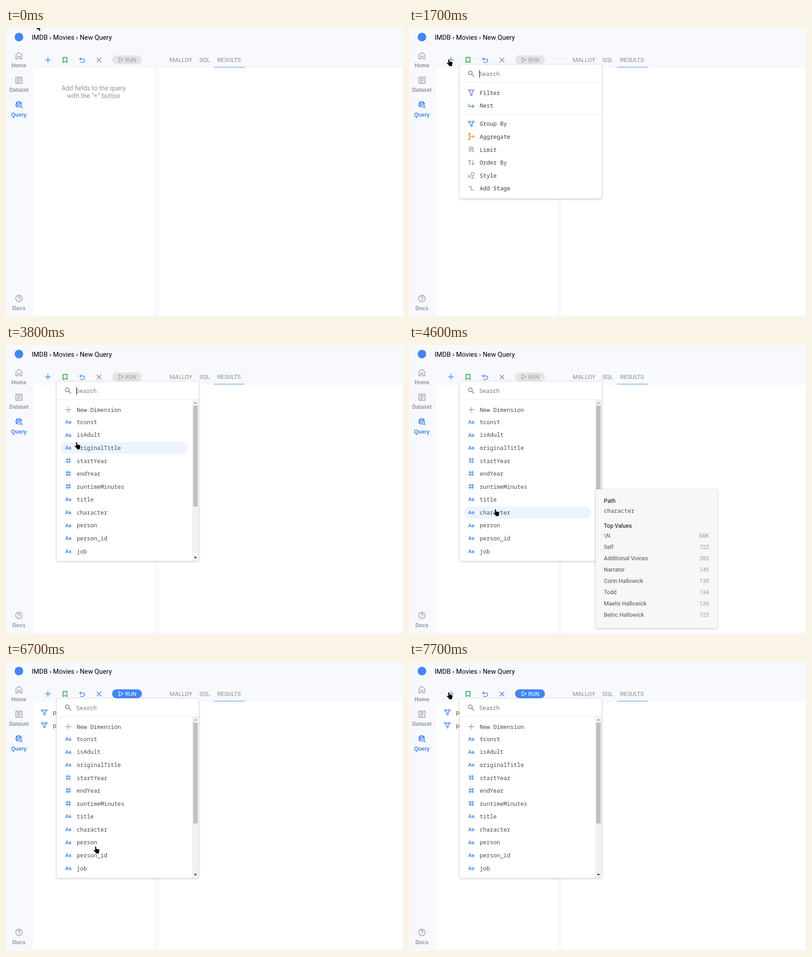
Write an HTML page with a canvas that moves like this. It is 876 by 639 pixels and loops after 8 s.

```html
<!DOCTYPE html>
<html lang="en">
<head>
<meta charset="utf-8">
<title>Query builder</title>
<style>
  html, body { margin: 0; width: 100%; height: 100%; overflow: hidden; background: #f8f9fd; }
  canvas { display: block; width: 876px; height: 639px; }
</style>
</head>
<body>
<canvas id="stage" width="876" height="639"></canvas>
<script>
const ctx = document.getElementById('stage').getContext('2d');
const LOOP = 8000, TICK = 100;
const BLUE = '#4285f4', GREEN = '#2ba24c', ORANGE = '#e8850c', PURPLE = '#7c5cd6', GRAY = '#939699';
const PAGE = '#f8f9fd', RULE = '#ececee';
const SANS = 'Roboto, sans-serif';
const MONO = '12.5px "Roboto Mono", "Noto Sans Mono", monospace';
const ROW = 28.57;

const ring = (x, y, r) =>
  `M${x - r} ${y}a${r} ${r} 0 1 0 ${2 * r} 0a${r} ${r} 0 1 0 ${-2 * r} 0`;

// Icon outlines, each around its own centre
const ICONS = {
  home: 'M-6.5 7.2V-2L0 -7.2L6.5 -2V7.2H2.2V1.5H-2.2V7.2Z',
  dataset: 'M-6.8 -6.8H6.8V6.8H-6.8ZM-4 -3.2H4M-4 0H4M-4 3.2H1.5',
  help: ring(0, 0, 7.2) + 'M-2.2 -1.7C-2.2 -4.8 2.4 -4.8 2.4 -1.8C2.4 0 0 0.2 0 2M0 3.3V4.6',
  plus: 'M-6.5 0H6.5M0 -6.5V6.5',
  bookmark: 'M-4.3 -5.6H4.3V5.4L0 3.4L-4.3 5.4Z',
  undo: 'M-2.5 -5.5L-5.5 -2.4L-2.5 .7M-5.5 -2.4H2C7 -2.4 7 5 2 5H-4',
  close: 'M-5 -5L5 5M5 -5L-5 5',
  play: 'M-4.5 -5L5 0L-4.5 5Z',
  search: ring(-1.7, -1.7, 4.2) + 'M1.6 1.6L6.8 6.8',
  filter: 'M-6 -5.8H6L1.7 0V5.8H-1.7V0Z',
  nest: 'M-5.5 -4.5V1.5H5.5M2.2 -2L5.8 1.5L2.2 5',
  group: ring(-4.6, -4.2, 1.9) + ring(4.6, -4.2, 1.9) + ring(.4, 4.4, 1.9) +
    'M-2.7 -4.2H2.7M-3.7 -2.5L-.6 2.8M3.8 -2.5L1.3 2.8',
  aggregate: ring(-3.8, -5.4, 1.9) + ring(-3.8, 5.2, 1.9) +
    'M-3.8 -3.5V3.3M-3.8 0H6.3M3.2 -3L6.4 0L3.2 3',
  limit: 'M-5.5 -5.2H5.5M-5.5 -2.2H5.5M-5.5 .8H5.5M-5.5 3.8H0M2 3L4 5L6 3',
  order: 'M-3.5 5.5V-5M-6.5 -2L-3.5 -5L-.5 -2M3.5 -5.5V5M.5 2L3.5 5L6.5 2',
  style: ring(3.2, -3, 3.4) + ring(-4.4, 2.6, 2.2) + ring(2.8, 5, 1.6),
  stage: 'M-6 -3.8H0V3.8H6',
  hash: 'M-2.6 -6V6M2.6 -6V6M-6 -2.6H6M-6 2.6H6',
  land: 'M-6.5 -1.5L-2 2V7M1 -6.5V-4.2H-2V-1.5H2',
  lens: ring(3.4, 3.2, 2.7) + 'M5.3 5.1L8.4 8.2'
};
const ARROW = new Path2D('M.5 0V14L3.7 11.2L6 16.4L8.6 15.3L6.3 10.2H10.8Z');
const HAND = new Path2D('M3.5 1.2C3.5 -.2 6 -.2 6 1.2V5L11.5 6.2C13 6.6 13.3 7.3 13 9' +
  'L12 12.5V15.3H5.2V13.5L.8 9.2C0 8 1.4 6.9 2.6 8L3.9 9Z');

const ACTIONS = [
  ['Filter', 'filter', PURPLE, 143.5], ['Nest', 'nest', GREEN, 172],
  ['Group By', 'group', BLUE, 212], ['Aggregate', 'aggregate', ORANGE, 240.6],
  ['Limit', 'limit', GRAY, 269.2], ['Order By', 'order', GRAY, 297.8],
  ['Style', 'style', GRAY, 326.4], ['Add Stage', 'stage', GRAY, 355]
];
const FIELDS = ['tconst', 'isAdult', 'originalTitle', 'startYear', 'endYear', 'runtimeMinutes',
  'title', 'character', 'person', 'person_id', 'job'];
const NUMERIC = /Year|Minutes/;

const TOP = {
  character: [['\\N', '88K'], ['Self', 722], ['Additional Voices', 283], ['Narrator', 145],
    ['Corin Hallowick', 135], ['Todd', 134], ['Maelis Hallowick', 126], ['Belric Hallowick', 123]],
  person: ['Orlen Tavish', 'Mira Quennell', 'Pell Ostrander', 'Jorin Maddick', 'Tessa Wrenfield',
    'Aldo Brimley', 'Nell Harkaway', 'Ivor Stanwell'].map((n, i) => [n, 214 - 9 * i]),
  person_id: Array.from({ length: 8 }, (_, i) => ['nm00' + (10473 + i * 3719), 214 - 9 * i])
};
// [start, end, field]
const TIPS = [[4500, 4800, 'character'], [4800, 5200, 'person'],
  [5600, 6100, 'person_id'], [6500, 6700, 'person_id']];
const CARET = [[1300, 1900], [2300, 2900], [3400, 4400], [5000, 5200]];

// Pointer path: [time, x, y]
const PATH = [
  [0, 67.5, -10], [200, 67.5, -10], [600, 80, 32], [900, 82, 67], [1400, 82, 67], [1700, 83, 69],
  [1900, 94, 98], [2300, 129, 173], [2400, 134, 181], [2500, 134, 181], [2800, 147, 217],
  [3100, 153, 227], [3400, 152, 217], [3500, 152, 217], [3600, 151, 215], [4000, 151, 215],
  [4300, 168, 285], [4600, 186, 363], [4900, 185, 391], [5000, 184, 394], [5100, 184, 394],
  [5600, 193, 419], [6000, 193, 419], [6500, 194, 416], [6600, 194, 416], [6700, 193, 408],
  [7000, 176, 300], [7300, 118, 120], [7500, 95, 66], [7700, 83, 67], [8000, 83, 67]
];

const during = (t, [from, to]) => t >= from && t < to;

function pointerAt(t) {
  const i = PATH.findIndex(k => k[0] > t);
  const [t0, x0, y0] = PATH[i - 1], [t1, x1, y1] = PATH[i];
  const k = (t - t0) / (t1 - t0);
  return { x: x0 + (x1 - x0) * k, y: y0 + (y1 - y0) * k };
}

function text(str, x, y, font, color, align = 'left') {
  ctx.font = font;
  ctx.fillStyle = color;
  ctx.textAlign = align;
  ctx.fillText(str, x, y);
}

function icon(name, x, y, color, width = 1.4) {
  ctx.save();
  ctx.translate(x, y);
  ctx.strokeStyle = color;
  ctx.lineWidth = width;
  ctx.stroke(new Path2D(ICONS[name]));
  ctx.restore();
}

function box(x, y, w, h, r, color) {
  ctx.fillStyle = color;
  ctx.beginPath();
  ctx.roundRect(x, y, w, h, r);
  ctx.fill();
}

function card(x, y, w, h, color) {
  ctx.save();
  ctx.shadowColor = 'rgba(0,0,0,.27)';
  ctx.shadowBlur = 5;
  ctx.shadowOffsetY = 1;
  box(x, y, w, h, 3, color);
  ctx.restore();
}

function disc(x, y, r, color) {
  ctx.fillStyle = color;
  ctx.beginPath();
  ctx.arc(x, y, r, 0, 7);
  ctx.fill();
}

function triangle(x, y, dir, color) {
  ctx.fillStyle = color;
  ctx.beginPath();
  ctx.moveTo(x - 3.5, y - 2 * dir);
  ctx.lineTo(x + 3.5, y - 2 * dir);
  ctx.lineTo(x, y + 2 * dir);
  ctx.fill();
}

function sidebar() {
  const label = (str, y, color) =>
    text(str, 28.5, y, 'bold 11.9px "Liberation Sans", Arial, sans-serif', color, 'center');
  disc(28.5, 20, 9.5, BLUE);
  icon('home', 28.5, 61, GRAY);
  label('Home', 87, GRAY);
  icon('dataset', 28.5, 115.5, GRAY);
  label('Dataset', 141, GRAY);

  disc(28, 169, 7.3, BLUE);
  icon('land', 28, 169, PAGE, 1.2);
  disc(31.4, 172.2, 4.6, PAGE);
  icon('lens', 28, 169, BLUE, 1.5);
  label('Query', 195.5, BLUE);

  icon('help', 28.5, 598, GRAY);
  label('Docs', 624, GRAY);
}

function toolbar(active) {
  text('IMDB › Movies › New Query', 56.5, 26, '14.7px ' + SANS, '#000');
  icon('plus', 92.5, 70.5, BLUE, 1.6);
  icon('bookmark', 130.2, 70.7, GREEN, 1.7);
  icon('undo', 168, 71, BLUE, 1.5);
  icon('close', 205.2, 70.7, active ? BLUE : '#8a8a8a', 1.6);
  box(234, 60.5, 66, 19.5, 9.75, active ? BLUE : '#e4e4e6');
  const ink = active ? '#fff' : '#9a9a9a';
  icon('play', 253.8, 70.3, ink, 1.2);
  text('RUN', 263, 74.7, '12.5px ' + SANS, ink);

  const tab = (str, x) => text(str, x, 75, '13px ' + SANS, '#8c8c8c');
  tab('MALLOY', 361);
  tab('SQL', 426.5);
  tab('RESULTS', 466);
  box(459, 86, 68, 1, 0, BLUE);
}

function panels(t) {
  box(60, 88, 267.5, 547.5, 4, '#fff');
  box(336.5, 88, 560, 547.5, 4, '#fff');
  if (t < 5200) {
    text('Add fields to the query', 193.5, 137.5, '14.3px ' + SANS, '#959595', 'center');
    text('with the “+” button', 193.5, 154.5, '14.3px ' + SANS, '#959595', 'center');
    return;
  }
  const chosen = t < 6100 ? ['person'] : ['person', 'person_id'];
  chosen.forEach((name, i) => {
    icon('group', 84.5, 111 + i * 28.5, BLUE);
    text(name, 103.5, 116 + i * 28.5, MONO, '#4a4a4a');
  });
}

function highlight(y, right, pointer) {
  const hot = pointer.y + 5;
  if (pointer.x > 118 && pointer.x < right && Math.abs(hot - y) < 13.2)
    box(121, y - 13.4, right - 121, 26.8, 13.4, '#edf4fe');
}

function menuFrame(height, t) {
  card(112, 81, 313, height, '#fff');
  icon('search', 137, 100.8, '#8c8c8c', 1.8);
  text('Search', 155, 106, MONO, '#757575');
  if (CARET.some(span => during(t, span))) box(155, 93, 1, 17, 0, '#000');
  box(112, 120, 313, 1, 0, RULE);
}

function actionMenu(t, pointer) {
  menuFrame(296, t);
  box(112, 191, 313, 1, 0, RULE);
  for (const [name, glyph, color, y] of ACTIONS) {
    if (t >= 2600) highlight(y, 416, pointer);
    icon(glyph, 137.3, y - .5, color);
    text(name, 156, y + 4.3, MONO, '#3c3c3c');
  }
}

function fieldMenu(t, pointer) {
  menuFrame(396.5, t);
  icon('plus', 137.3, 143, '#9a9a9a', 1.3);
  text('New Dimension', 156, 147.8, MONO, '#4a4a4a');
  FIELDS.forEach((name, i) => {
    const y = 170.3 + i * ROW;
    highlight(y, 402.5, pointer);
    if (NUMERIC.test(name)) icon('hash', 137.5, y - .5, BLUE, 1.4);
    else text('Aa', 137.5, y + 3.7, 'bold 11px ' + SANS, BLUE, 'center');
    text(name, 156, y + 4.5, MONO, '#4a4a4a');
  });
  box(411, 121, 14, 356.5, [0, 0, 3, 0], '#f1f1f1');
  box(413, 134, 10, 223, 0, '#c1c1c1');
  triangle(418, 127.5, -1, '#a3a3a3');
  triangle(418, 470.5, 1, '#404040');
}

function tooltip(field) {
  const font = '12.5px ' + SANS;
  card(412, 319, 268.5, 307, '#f7f7f7');
  text('Path', 430, 349, font, '#000');
  text(field, 430, 371.3, MONO, '#4a4a4a');
  text('Top Values', 430, 404.3, font, '#000');
  TOP[field].forEach(([name, count], i) => {
    const y = 425.7 + i * 25;
    text(name, 430, y, font, '#505050');
    text(count, 662, y, font, '#9a9a9a', 'right');
  });
}

function cursor(t, { x, y }) {
  const shape = t < 700 || during(t, [1800, 2600]) ? ARROW : HAND;
  ctx.save();
  ctx.translate(x, y);
  ctx.strokeStyle = '#fff';
  ctx.lineWidth = 1.6;
  ctx.stroke(shape);
  ctx.fillStyle = '#000';
  ctx.fill(shape);
  ctx.restore();
}

function draw(t) {
  const pointer = pointerAt(t);
  ctx.fillStyle = PAGE;
  ctx.fillRect(0, 0, 876, 639);
  sidebar();
  toolbar(t >= 5200);
  panels(t);
  if (t >= 3800) fieldMenu(t, pointer);
  else if (t >= 1300) actionMenu(t, pointer);
  const tip = TIPS.find(span => during(t, span));
  if (tip) tooltip(tip[2]);
  cursor(t, pointer);
}

const start = performance.now();
function loop() {
  const t = (performance.now() - start) % LOOP;
  draw(Math.floor(t / TICK) * TICK);
  requestAnimationFrame(loop);
}
loop();
</script>
</body>
</html>
```
